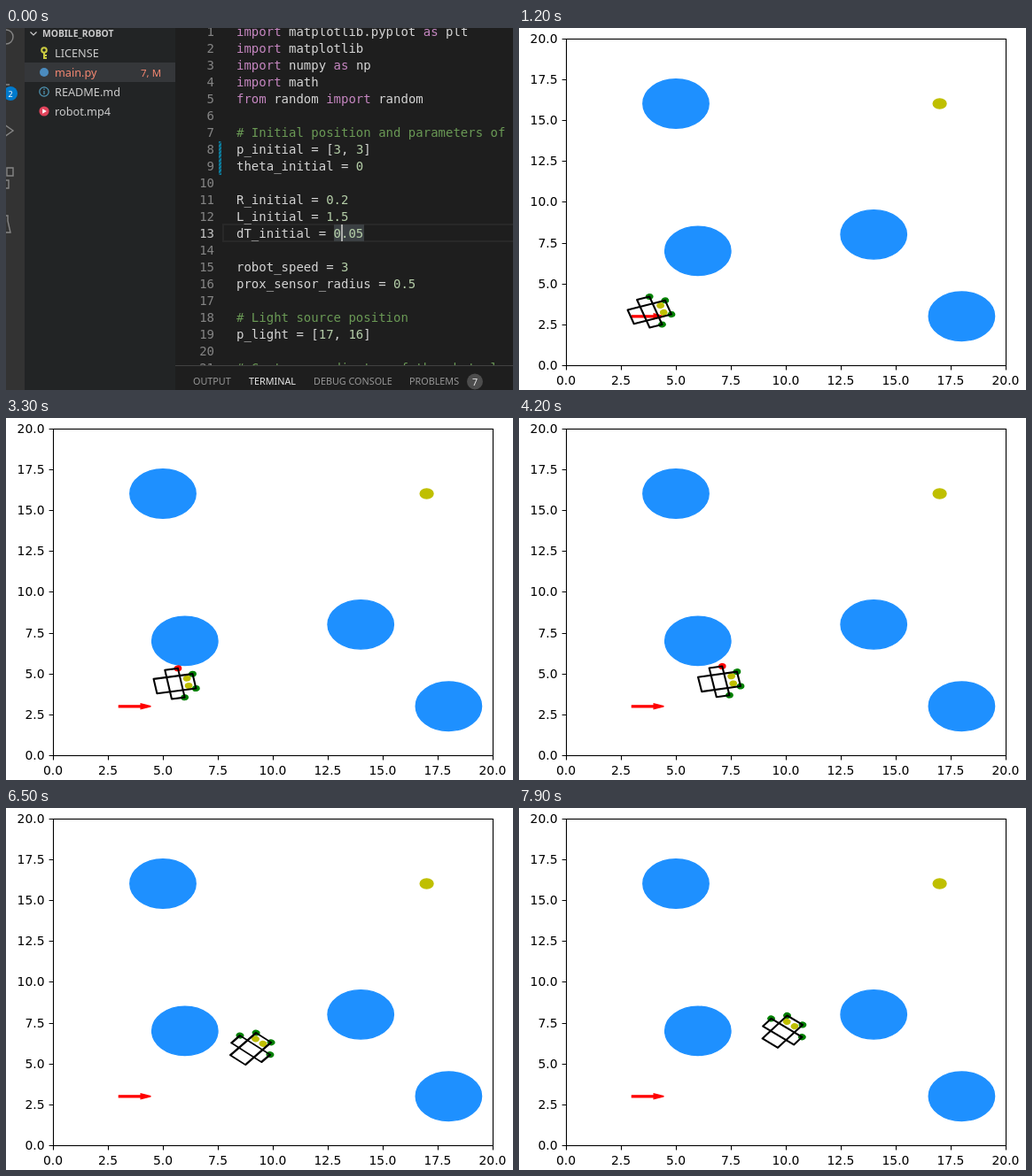
Write an HTML page that moves like this. It is 572 by 409 pixels and loops after 8 s.

```html
<!DOCTYPE html>
<html lang="en">
<head>
<meta charset="utf-8">
<title>Mobile robot</title>
<style>
html, body { margin: 0; width: 100%; height: 100%; overflow: hidden; background: #fff; }
#editor, #plot { position: absolute; left: 0; top: 0; width: 572px; height: 409px; overflow: hidden; }
#editor { background: #1e1e1e; }
#plot { visibility: hidden; background: #fff; }
#side { position: absolute; width: 191px; height: 409px; left: 0; top: 0; }
#side text { font: 12.7px "Noto Sans", sans-serif; fill: #ccc; }
#side .title { font-size: 10.3px; font-weight: 700; }
#side .error { fill: #f48771; }
#side .badge { font-size: 9px; fill: #fff; text-anchor: middle; }
.bar { fill: none; stroke: #858585; stroke-width: 1.4; }
pre { position: absolute; top: -5px; margin: 0; font: 14px/19px "DejaVu Sans Mono", monospace; color: #d4d4d4; }
#nums { left: 195px; width: 40px; text-align: right; color: #858585; }
#nums b { font-weight: 400; color: #c6c6c6; }
#code { left: 260px; }
#code i { font-style: normal; color: #c586c0; }
#code u { text-decoration: none; color: #b5cea8; }
#code em { font-style: normal; color: #6a9955; }
#editor div { position: absolute; box-sizing: border-box; }
#line { left: 244px; top: 221px; width: 330px; height: 21px; border: 2px solid #282828; border-right: 0; }
#word { left: 370px; top: 222px; width: 34px; height: 19px; background: #3b4043; }
#caret { left: 378px; top: 222px; width: 2px; height: 19px; background: #aeafad; }
#diff { left: 240px; top: 128px; width: 3px; height: 38px;
  background: repeating-linear-gradient(-45deg, #0c7d9d 0 2px, #16495a 2px 3px); }
#panel { left: 191px; top: 381px; width: 381px; height: 28px; background: #1e1e1e; border-top: 1px solid #414141; }
#panel svg { position: absolute; left: 0; top: -1px; }
#panel text { font: 10.8px "Noto Sans", sans-serif; fill: #969696; }
#panel .on { fill: #e7e7e7; }
#plot text { font: 13.89px "DejaVu Sans", sans-serif; }
#data * { vector-effect: non-scaling-stroke; stroke-width: 1.39; }
#data rect { fill: none; stroke: #000; stroke-width: 2.08; stroke-linejoin: round; }
</style>
</head>
<body>
<div id="editor">
  <svg id="side" viewBox="0 0 191 409">
    <rect width="191" height="409" fill="#222425"/>
    <rect width="21" height="409" fill="#333"/>
    <rect x="21" y="39" width="170" height="22" fill="#35373a"/>
    <g class="bar">
      <circle cx="0" cy="10" r="8"/>
      <path d="M0 64h4M-2 109L8 116L-2 123M1 158H8V167H1zM-1 172H3V181H-1M0 212H2V218L5 231H-2"/>
    </g>
    <circle cx="5" cy="74" r="8" fill="#007acc"/>
    <text class="badge" x="5" y="77.5">2</text>
    <path d="M27.5 4.5l3.5 3.5 3.5-3.5" fill="none" stroke="#ccc" stroke-width="1.2"/>
    <text class="title" x="41" y="10.4">MOBILE_ROBOT</text>
    <g fill="none" stroke="#cbcb41" stroke-width="2">
      <circle cx="43" cy="25" r="2.8"/>
      <path d="M43 28v7M43 31h3M43 34h3"/>
    </g>
    <circle cx="43" cy="50" r="5" fill="#4b8bbe"/>
    <g fill="none" stroke="#519aba" stroke-width="1.2">
      <circle cx="43" cy="72" r="5.2"/>
      <path d="M43 71v4M43 68.5v1.4"/>
    </g>
    <circle cx="43" cy="94" r="5.6" fill="#e0435b"/>
    <path d="M41.2 91.2v5.6l4.6-2.8z" fill="#fff"/>
    <text x="55" y="33">LICENSE</text>
    <text class="error" x="55" y="55">main.py</text>
    <text class="error" x="152" y="54.5" style="font-size:11.5px">7, M</text>
    <text x="55" y="77">README.md</text>
    <text x="55" y="99">robot.mp4</text>
  </svg>
  <div id="diff"></div><div id="line"></div><div id="word"></div>
  <pre id="nums"></pre>
<pre id="code"><i>import</i> matplotlib.pyplot <i>as</i> plt
<i>import</i> matplotlib
<i>import</i> numpy <i>as</i> np
<i>import</i> math
<i>from</i> random <i>import</i> random

<em># Initial position and parameters of</em>
p_initial = [<u>3</u>, <u>3</u>]
theta_initial = <u>0</u>

R_initial = <u>0.2</u>
L_initial = <u>1.5</u>
dT_initial = <u>0.05</u>

robot_speed = <u>3</u>
prox_sensor_radius = <u>0.5</u>

<em># Light source position</em>
p_light = [<u>17</u>, <u>16</u>]

<em># Center coordinates of the obstacle</em></pre>
  <div id="caret"></div>
  <div id="panel">
    <svg width="381" height="28">
      <text x="20" y="22">OUTPUT</text>
      <text class="on" x="83" y="22">TERMINAL</text>
      <text x="156" y="22">DEBUG CONSOLE</text>
      <text x="264" y="22">PROBLEMS</text>
      <circle cx="338" cy="18.5" r="9" fill="#4d4d4d"/>
      <text class="on" x="338" y="22.5" text-anchor="middle">7</text>
    </svg>
  </div>
</div>

<svg id="plot" viewBox="0 0 572 409">
  <g id="axes" stroke="#000" stroke-width="1.11" fill="none">
    <rect x="53.5" y="12.5" width="496" height="369"/>
  </g>
  <g id="labels"></g>
  <g id="data" transform="translate(53 381.2) scale(24.8 -18.48)">
    <g id="world"></g>
    <path d="M3 3.05H4V3.15L4.45 3L4 2.85V2.95H3z" fill="red" stroke="red"/>
    <g id="robot">
      <g id="sensors"></g>
      <rect x="-.9" y="-.45" width="1.8" height=".9"/>
      <rect x="-.3" y="-.9" width=".6" height="1.8"/>
    </g>
  </g>
</svg>

<script>
const $ = id => document.getElementById(id);
const add = (parent, tag, attrs, text = '') => {
  const el = document.createElementNS('http://www.w3.org/2000/svg', tag);
  for (const k in attrs) el.setAttribute(k, attrs[k]);
  el.textContent = text;
  return parent.appendChild(el);
};
const paint = (el, color) => {
  el.setAttribute('fill', color);
  el.setAttribute('stroke', color);
  return el;
};
const dot = (parent, cx, cy, r, color) => paint(add(parent, 'circle', { cx, cy, r }), color);

$('nums').innerHTML = Array.from({ length: 21 }, (_, i) => i === 12 ? '<b>13</b>' : i + 1).join('\n');

for (let v = 0; v <= 20; v += 2.5) {
  const x = 53 + v * 24.8, y = 381.2 - v * 18.48;
  const label = v.toFixed(1);
  add($('axes'), 'path', { d: `M${Math.round(x) + .5} 381.5v4.9M53.5 ${Math.round(y) + .5}h-4.9` });
  add($('labels'), 'text', { x, y: 403, 'text-anchor': 'middle' }, label);
  add($('labels'), 'text', { x: 43.5, y: Math.round(y + 5), 'text-anchor': 'end' }, label);
}

const obstacles = [[5, 16], [6, 7], [14, 8], [18, 3]];
obstacles.forEach(([x, y]) => dot($('world'), x, y, 1.5, '#1e90ff'));
dot($('world'), 17, 16, .3, '#bfbf00');

const prox = [[.3, .9], [.9, .45], [.9, -.45], [.3, -.9]];
const proxDots = prox.map(([x, y]) => dot($('sensors'), x, y, .15, 'green'));
[.225, -.225].forEach(y => dot($('sensors'), .6, y, .15, '#bfbf00'));

const rad = Math.PI / 180;
// The drive passes these points: time in ms, x, y, heading in degrees
const route = [
  [300, 3, 3, 0], [2200, 4.585, 3.85, 39.4], [3300, 5.543, 4.383, 9.9], [3900, 6.6, 4.465, 3],
  [5100, 8.033, 4.927, 33.5], [6500, 8.997, 5.905, 49.5], [7900, 9.85, 6.955, 51.3]
];

// Hermite curve between two points, leaving and arriving along the headings
function poseAt(t) {
  const i = Math.max(1, route.findIndex(p => p[0] >= t));
  const [t0, x0, y0, a0] = route[i - 1], [t1, x1, y1, a1] = route[i];
  const s = (t - t0) / (t1 - t0), len = Math.hypot(x1 - x0, y1 - y0);
  const curve = (p, q, m, n) =>
    p + (q - p) * s * s * (3 - 2 * s) + len * s * (1 - s) * (m * (1 - s) - n * s);
  return [
    curve(x0, x1, Math.cos(a0 * rad), Math.cos(a1 * rad)),
    curve(y0, y1, Math.sin(a0 * rad), Math.sin(a1 * rad)),
    a0 + (a1 - a0) * s
  ];
}

function place([x, y, deg]) {
  $('robot').setAttribute('transform', `translate(${x} ${y}) rotate(${deg})`);
  const c = Math.cos(deg * rad), s = Math.sin(deg * rad);
  prox.forEach(([u, v], i) => {
    const px = x + u * c - v * s, py = y + u * s + v * c;
    const near = obstacles.some(([ox, oy]) => Math.hypot(px - ox, py - oy) < 2);
    paint(proxDots[i], near ? 'red' : 'green');
  });
}

// Twelve plot updates per two seconds, shown on a 100 ms grid
const LOOP = 8000, START = 300, CYCLE = 2000, STEP = 1900 / 12, GRID = 100;
const snap = t => Math.floor(t / GRID) * GRID;

function updateTime(t) {
  const lead = START - GRID;
  const begin = Math.max(START, lead + CYCLE * Math.floor((t - lead) / CYCLE));
  const k = Math.ceil((snap(t) + GRID - begin) / STEP) - 1;
  return snap(begin + STEP * Math.min(11, k));
}

function frame() {
  const t = performance.now() % LOOP, running = t >= START;
  $('plot').style.visibility = running ? 'visible' : 'hidden';
  if (running) place(poseAt(updateTime(t)));
  requestAnimationFrame(frame);
}
frame();
</script>
</body>
</html>
```
